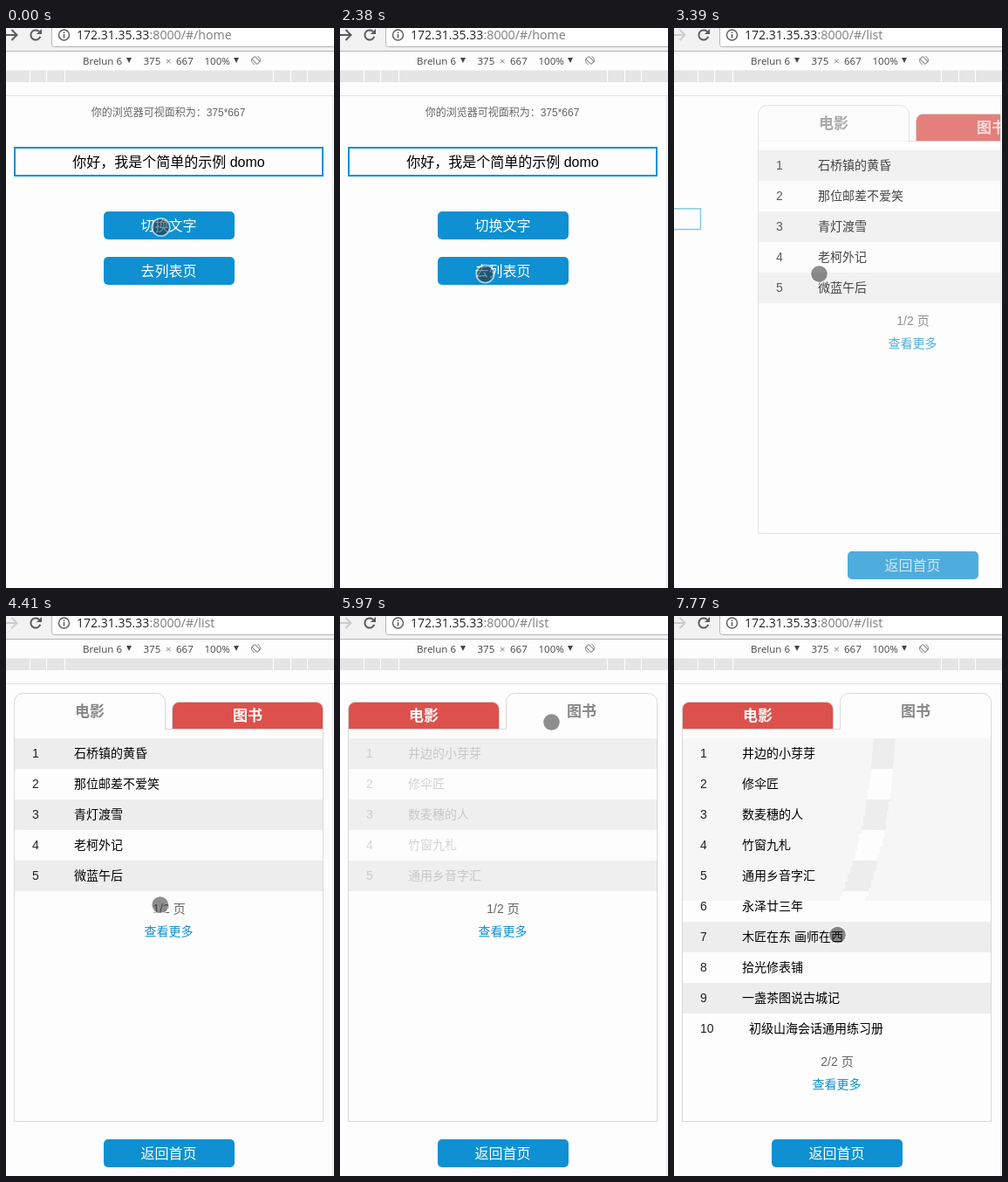
These frames come from a looping animation (376x641 px, 8 s). An HTML page with a canvas:

```html
<!DOCTYPE html>
<html lang="zh-CN">
<head>
<meta charset="utf-8">
<title>列表演示</title>
<style>
  html, body { margin: 0; width: 100%; height: 100%; overflow: hidden; background: #fdfdfd; }
  canvas { display: block; width: 376px; height: 641px; }
</style>
</head>
<body>
<canvas id="stage" width="376" height="641"></canvas>
<script>
const ctx = document.getElementById('stage').getContext('2d');
const LOOP = 8000;
const PAGE = '#fdfdfd', BLUE = '#0e90d2', RED = '#dd514c', STRIPE = '#ededed', EDGE = '#d9d9d9';
const SANS = '"Liberation Sans", "Noto Sans CJK SC", "Noto Sans CJK", sans-serif';
// Centred full-width punctuation
const CENTRED = '"Liberation Sans", "Noto Sans CJK TC", "Noto Sans CJK", sans-serif';
const UI = '"Open Sans", "Noto Sans", sans-serif';

const GREETING = '你好，我是个简单的示例 domo';
const REVERSED = [...GREETING].reverse().join('');
const FILMS = ['石桥镇的黄昏', '那位邮差不爱笑', '青灯渡雪', '老柯外记', '微蓝午后'];
const BOOKS = ['井边的小芽芽', '修伞匠', '数麦穗的人', '竹窗九札', '通用乡音字汇',
  '永泽廿三年', '木匠在东 画师在西', '拾光修表铺', '一盏茶图说古城记', '初级山海会话通用练习册'];

// Pointer moves: start, end, from, control, to, easing
const easeOut = p => u => 1 - Math.pow(1 - u, p);
const easeInOut = u => u * u * (3 - 2 * u);
const MOVES = [
  [1960, 2380, [177.5, 228], [171, 255], [166.5, 281.5], easeInOut],
  [4150, 4850, [166.5, 281.5], [174, 320], [183, 358], easeOut(2.2)],
  [5100, 5610, [183, 358], [197, 240], [242.5, 121.5], easeOut(2.93)],
  [6710, 7350, [242.5, 121.5], [236, 270], [187.5, 365], easeInOut]
];

const clamp = v => Math.max(0, Math.min(1, v));
const ramp = (t, a, b) => clamp((t - a) / (b - a));

function rect(x, y, w, h, color) {
  ctx.fillStyle = color;
  ctx.fillRect(x, y, w, h);
}

function text(s, x, y, size, color, align = 'left', font = SANS, weight = '') {
  ctx.font = `${weight} ${size}px ${font}`;
  ctx.textAlign = align;
  ctx.fillStyle = color;
  ctx.fillText(s, x, Math.round(y + size * 0.36));
}

function line(points, color, width = 1) {
  ctx.beginPath();
  points.forEach(([x, y]) => ctx.lineTo(x, y));
  ctx.strokeStyle = color;
  ctx.lineWidth = width;
  ctx.stroke();
}

function ring(x, y, r, color, width, from = 0, to = Math.PI * 2) {
  ctx.beginPath();
  ctx.arc(x, y, r, from, to);
  ctx.strokeStyle = color;
  ctx.lineWidth = width;
  ctx.stroke();
}

function triangle(x, y, r, color) {
  ctx.beginPath();
  ctx.moveTo(x - r, y - r);
  ctx.lineTo(x + r, y - r);
  ctx.lineTo(x, y + r);
  ctx.fillStyle = color;
  ctx.fill();
}

function faded(alpha, draw) {
  ctx.save();
  ctx.globalAlpha *= alpha;
  draw();
  ctx.restore();
}

function button(label, y) {
  ctx.beginPath();
  ctx.roundRect(112, y, 150, 32, 5);
  ctx.fillStyle = BLUE;
  ctx.fill();
  text(label, 186.5, y + 16, 16, '#fff', 'center', SANS, 500);
}

function chrome(path, canForward) {
  rect(0, 0, 376, 26, '#f2f2f2');
  ctx.beginPath();
  ctx.roundRect(52.5, -8, 340, 29.5, 3);
  ctx.fillStyle = '#fff';
  ctx.fill();
  ctx.strokeStyle = '#b4b4b4';
  ctx.lineWidth = 1;
  ctx.stroke();

  const arrow = canForward ? '#5a5a5a' : '#cccccc';
  line([[-2, 8], [12, 8]], arrow, 2);
  line([[6.5, 2], [12.5, 8], [6.5, 14]], arrow, 2);

  ring(34, 8, 5.6, '#5a5a5a', 2, 0.35, 5.5);
  ctx.beginPath();
  ctx.moveTo(41, 1);
  ctx.lineTo(41, 7);
  ctx.lineTo(35, 7);
  ctx.fillStyle = '#5a5a5a';
  ctx.fill();

  ring(66.5, 8, 6, '#5a5a5a', 1.4);
  rect(65.7, 7, 1.6, 4.5, '#5a5a5a');
  rect(65.7, 4.4, 1.6, 1.6, '#5a5a5a');
  text('172.31.35.33', 81, 8, 14, '#222', 'left', UI);
  text(':8000/#/' + path, 164.5, 8, 14.2, '#7d7d7d', 'left', UI);

  rect(0, 26, 376, 1, '#b6b6b6');
  const label = (s, x, color = '#444') => text(s, x, 38, 11.5, color, 'left', UI);
  label('Brelun 6', 88);
  label('375', 157.5);
  label('×', 183, '#888');
  label('667', 195);
  label('100%', 227.5);
  triangle(141, 37, 3, '#444');
  triangle(264, 37, 3, '#444');

  ctx.save();
  ctx.translate(286.5, 37);
  ring(0, 0, 5, '#888', 1, -1.2, 0.5);
  ring(0, 0, 5, '#888', 1, 1.9, 3.6);
  ctx.rotate(-Math.PI / 4);
  ctx.beginPath();
  ctx.roundRect(-2.2, -4.2, 4.4, 8.4, 1);
  ctx.stroke();
  ctx.restore();

  rect(0, 48, 376, 1, '#f0f0f0');
  rect(0, 49, 376, 13, '#e5e5e5');
  [27, 46, 67, 306, 326, 345].forEach(x => rect(x, 49, 1, 13, '#fff'));
  rect(0, 77, 376, 1, '#e0e0e0');
  rect(374, 78, 1, 563, '#e4e4e4');
}

function home(t) {
  text('你的浏览器可视面积为：375*667', 186, 97, 12, '#666', 'center', CENTRED);
  ctx.strokeStyle = BLUE;
  ctx.lineWidth = 2;
  ctx.strokeRect(10, 137, 353, 32);
  const swapped = t >= 240 && t < 1330;
  text(swapped ? REVERSED : GREETING, 186.5, 153, 16, '#000', 'center', CENTRED);
  button('切换文字', 210);
  button('去列表页', 262);
}

function tab(label, x, active) {
  const top = active ? 88.5 : 98.5, r = active ? 10 : 8;
  ctx.beginPath();
  ctx.roundRect(x + 0.5, top, 173, 129.5 - top, [r, r, 0, 0]);
  ctx.fillStyle = active ? PAGE : RED;
  ctx.fill();
  ctx.strokeStyle = EDGE;
  ctx.lineWidth = 1;
  ctx.stroke();
  if (active) rect(x + 1, 128, 172, 3, PAGE);
  text(label, x + 87, active ? 109 : 114, 17, active ? '#888' : '#fff', 'center', SANS, 'bold');
}

function stripes(from, to) {
  for (let i = from; i < to; i++) rect(10, 140 + 35 * i, 353, 35, i % 2 ? PAGE : STRIPE);
}

function rows(names, from, to) {
  for (let i = from; i < to; i++) {
    const y = 157 + 35 * i;
    text(i + 1, 30, y, 14, '#222');
    text(names[i], i === 9 ? 86 : 78, y, 14, '#000');
  }
}

function pager(page, y) {
  text(page + '/2 页', 187, y, 14, '#666', 'center');
  text('查看更多', 186.5, y + 26, 14, BLUE, 'center');
}

function pathPoint([, , a, c, b], u) {
  const v = 1 - u;
  return [0, 1].map(k => v * v * a[k] + 2 * u * v * c[k] + u * u * b[k]);
}

// Pale veil over the list; the pointer wipes it away where it passes
function veil(t, bottom) {
  rect(10, 140, 353, bottom - 140, '#f6f6f6');
  const move = MOVES[3];
  const u = move[5](ramp(t, move[0], move[1]));
  if (!u) return;
  ctx.save();
  ctx.beginPath();
  ctx.rect(10, 140, 353, bottom - 140);
  ctx.clip();
  ctx.beginPath();
  for (let s = 0; s <= u; s += 0.04) {
    const [x, y] = pathPoint(move, s);
    ctx.rect(Math.round(x) - 12, Math.round(y) - 12, 24, 24);
  }
  ctx.clip();
  rect(10, 140, 353, 250, PAGE);
  stripes(0, 5);
  ctx.restore();
}

function list(t) {
  const books = t >= 5970, more = t >= 7650;
  ctx.strokeStyle = EDGE;
  ctx.lineWidth = 1;
  ctx.strokeRect(9.5, 129.5, 354, 449);
  tab('电影', 9, !books);
  tab('图书', 190, books);

  if (!books) {
    stripes(0, 5);
    rows(FILMS, 0, 5);
    pager(1, 335);
  } else {
    const shown = ramp(t, 5940, 6120);
    if (shown < 1) stripes(0, 5);
    faded(shown, () => {
      veil(t, more ? 326 : 366);
      rows(BOOKS, 0, 5);
    });
    if (!more) pager(1, 335);
    else faded(ramp(t, 7610, 7770), () => {
      stripes(6, 10);
      rows(BOOKS, 5, 10);
      pager(2, 510);
    });
  }
  button('返回首页', 599);
}

// cubic-bezier(.42, 0, .58, 1)
function slide(x) {
  let lo = 0, hi = 1, s = 0.5;
  for (let i = 0; i < 20; i++) {
    s = (lo + hi) / 2;
    const bx = 3 * s * (1 - s) * ((1 - s) * 0.42 + s * 0.58) + s ** 3;
    if (bx < x) lo = s; else hi = s;
  }
  return s * s * (3 - 2 * s);
}

function pages(t) {
  const p = t < 3060 ? 0 : slide(ramp(t, 3042, 3565));
  ctx.save();
  ctx.beginPath();
  ctx.rect(0, 78, 374, 563);
  ctx.clip();
  if (t < 3565) faded(1 - 0.66 * p, () => {
    const s = 1 - 0.34 * p;
    ctx.translate(187 - 374 * p, 405);
    ctx.scale(s, s);
    ctx.translate(-187, -405);
    home(t);
  });
  if (p > 0) faded(p ** 1.2, () => {
    ctx.translate(Math.round(374 * (1 - p)), 0);
    list(t);
  });
  ctx.restore();
}

function pointer(t) {
  let move = MOVES[0];
  for (const m of MOVES) if (t >= m[0]) move = m;
  const [x, y] = pathPoint(move, move[5](ramp(t, move[0], move[1])));
  ctx.beginPath();
  ctx.arc(x, y, 9.5, 0, Math.PI * 2);
  ctx.fillStyle = 'rgba(32,32,32,.5)';
  ctx.fill();
  ring(x, y, 10.2, 'rgba(255,255,255,.6)', 1.8);
}

function draw(t) {
  rect(0, 0, 376, 641, PAGE);
  pages(t);
  chrome(t < 3060 ? 'home' : 'list', t < 3060);
  pointer(t);
}

let start;
function tick(now) {
  start ??= now;
  draw((now - start) % LOOP);
  requestAnimationFrame(tick);
}
requestAnimationFrame(tick);
</script>
</body>
</html>
```
